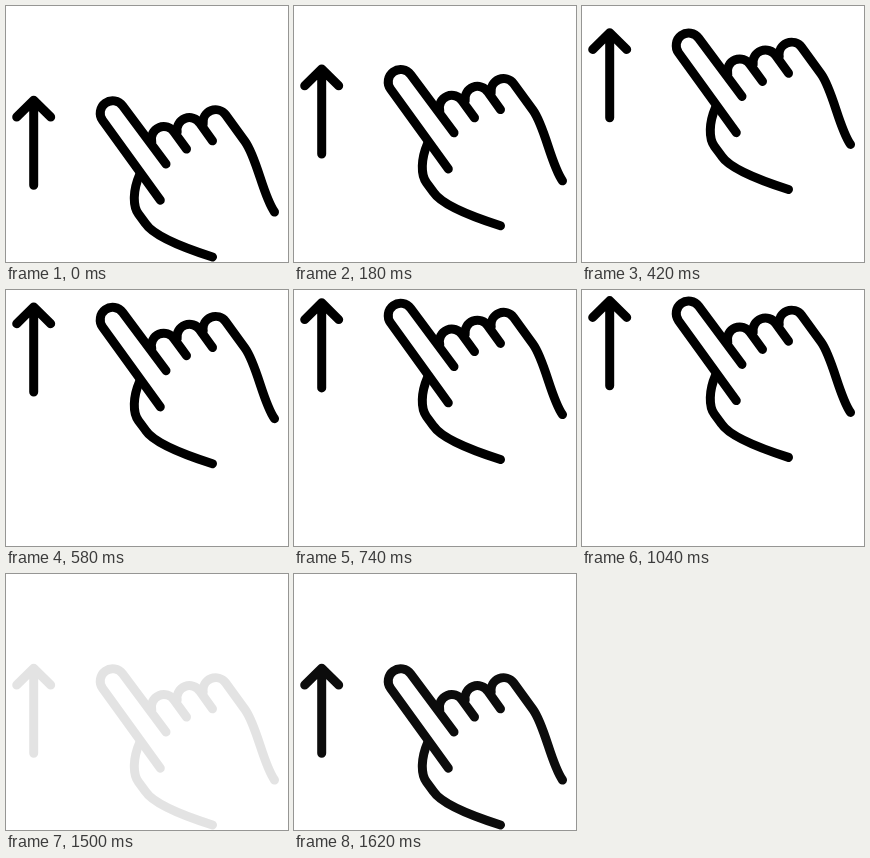
An HTML page for the animation above (1960 ms loop, 282 px wide and 256 px high).

```html
<!DOCTYPE html>
<html lang="en">
<head>
<meta charset="utf-8">
<title>Swipe up</title>
<style>
  html, body { margin: 0; width: 100%; height: 100%; overflow: hidden; background: #fff; }
  svg { display: block; width: 100%; height: 100%; }
</style>
</head>
<body>
<svg viewBox="0 0 282 256">
  <g id="gesture" fill="none" stroke="#000" stroke-width="9" stroke-linecap="round" stroke-linejoin="round">
    <path d="M27.7 179.3V94.2M10.7 111L27.7 94.2L44.7 111"/>
    <path d="M154.3 194.2L96.6 114.4A12.4 12.4 0 0 1 116.7 99.8L160 158"/>
    <path d="M145.8 136A12.4 12.4 0 0 1 168.3 126.3L180.5 143"/>
    <path d="M171.2 126A12.4 12.4 0 0 1 193.8 117.2L206.5 134.8"/>
    <path d="M197.2 118A12.5 12.5 0 0 1 219.6 108.8L239 135.5C251 152 257 190 268.5 206"/>
    <path d="M133.5 169C127 184 126.5 200 132.5 208L139.5 217.5C147 229 172 240 206.5 251"/>
  </g>
</svg>
<script>
const LOOP = 1960, STEP = 20;
const TRAVEL = 84, STIFFNESS = 0.0072;
const gesture = document.getElementById('gesture');
const clamp = (v, max) => Math.min(max, Math.max(0, v));

// Critically damped spring from 0 to 1
function spring(t) {
  const x = STIFFNESS * t;
  return 1 - (1 + x) * Math.exp(-x);
}

function opacityAt(t) {
  if (t < 1360) return clamp(1 - (t - 1083) / 135, 1);
  return clamp((t - 1485) / 142, 0.95);
}

function render(time) {
  const t = Math.floor((time % LOOP) / STEP) * STEP;
  const y = t < 1360 ? -TRAVEL * spring(t) : 0;
  gesture.setAttribute('transform', `translate(0 ${y.toFixed(2)})`);
  gesture.setAttribute('opacity', opacityAt(t).toFixed(3));
}

let start;
function tick(now) {
  start ??= now;
  render(Math.max(0, now - start));
  requestAnimationFrame(tick);
}
render(0);
requestAnimationFrame(tick);
</script>
</body>
</html>
```
